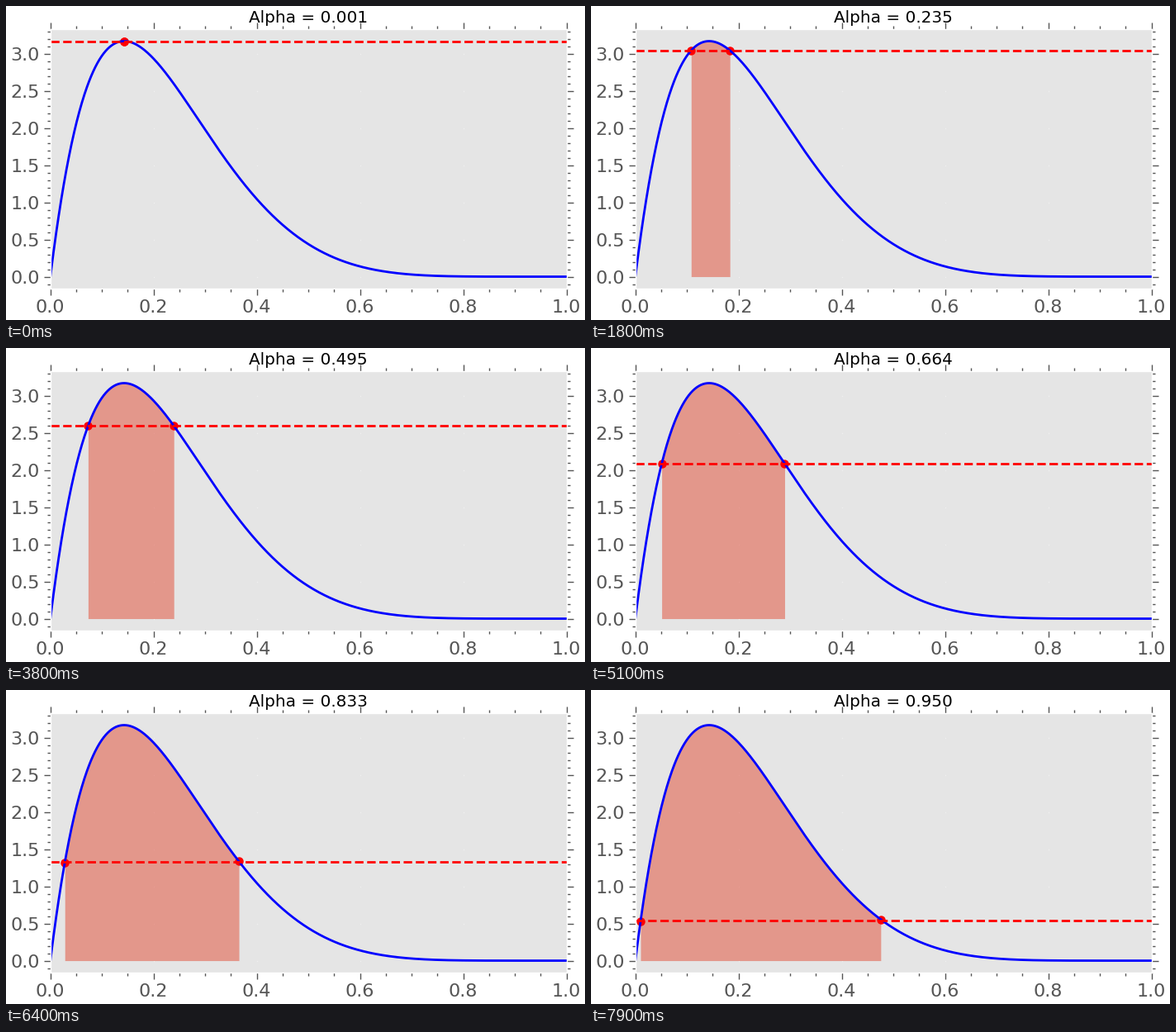
Recreate the animation shown at these times as a matplotlib script. Size 701x380 px, loop 8000 ms.

```python
import numpy as np
import matplotlib.pyplot as plt
from matplotlib.animation import FuncAnimation
from matplotlib.ticker import AutoMinorLocator, MultipleLocator

W, H, DPI = 701, 380, 100
LEFT, RIGHT, TOP, BOTTOM = 53.7, 678.6, 28.25, 341.8
FRAMES, INTERVAL = 80, 100
STEP, PEAK = 0.013, 76      # alpha climbs to PEAK, then turns back
MODE = 1 / 7
GREY = "#555555"


def pdf(x):
    """Density of Beta(2, 7)."""
    return 56 * x * (1 - x) ** 6


def cdf(x):
    return 1 - (1 - x) ** 7 * (1 + 7 * x)


# Pairs of points at equal density, with the mass between them
lows = np.linspace(0, MODE, 20001)
tail = np.linspace(1, MODE, 20001)
highs = np.interp(pdf(lows), pdf(tail), tail)
mass = cdf(highs) - cdf(lows)


def interval(alpha):
    """Ends of the narrowest interval holding the given mass."""
    low = np.interp(alpha, mass[::-1], lows[::-1])
    return low, np.interp(pdf(low), pdf(tail), tail)


plt.rcParams.update({"font.family": "DejaVu Sans", "font.size": 10})
fig = plt.figure(figsize=(W / DPI, H / DPI), dpi=DPI, facecolor="white")
ax = fig.add_axes([LEFT / W, 1 - BOTTOM / H, (RIGHT - LEFT) / W, (BOTTOM - TOP) / H],
                  facecolor="#E5E5E5")
top = pdf(MODE)
ax.set_xlim(0, 1)
ax.set_ylim(-0.05 * top, 1.05 * top)
for spine in ax.spines.values():
    spine.set(color="white", linewidth=1)

ax.xaxis.set_major_locator(MultipleLocator(0.2))
ax.yaxis.set_major_locator(MultipleLocator(0.5))
ax.xaxis.set_minor_locator(AutoMinorLocator(4))
ax.yaxis.set_minor_locator(AutoMinorLocator(5))
ax.tick_params(which="both", direction="out", top=True, right=True, color=GREY)
ax.tick_params(which="major", length=6, width=1, pad=3.5, labelsize=16, labelcolor=GREY)
ax.tick_params(which="minor", length=3, width=1)

# Barely visible grid crossings
gx, gy = np.meshgrid(np.arange(0.2, 0.9, 0.2), np.arange(0, 3.1, 0.5))
ax.plot(gx.ravel(), gy.ravel(), "s", ms=0.9, mew=0, color="white", alpha=0.45, zorder=0.5)

x = np.linspace(0, 1, 1000)
y = pdf(x)
area = ax.fill_between([0, 0], [0, 0], color="#E24A33", alpha=0.5, linewidth=0, zorder=1)
dots = ax.scatter([], [], s=36, color="red", linewidth=1.5, zorder=1.2)
ax.plot(x, y, color="blue", linewidth=2, zorder=2)
line = ax.axhline(top, color="red", linewidth=2, linestyle="--", zorder=2.1)
title = ax.set_title("", fontsize=14.4, color="black", y=1.0, pad=6)


def draw(i):
    alpha = 0.001 + STEP * (PEAK - abs(PEAK - i))
    # Snap both ends to the sampled curve
    a, b = (round(end * (len(x) - 1)) for end in interval(alpha))
    dots.set_offsets([(x[a], y[a]), (x[b], y[b])])
    line.set_ydata([(y[a] + y[b]) / 2] * 2)

    outline = np.column_stack([x[a:b + 1], y[a:b + 1]])
    area.set_verts([np.vstack([[x[a], 0], outline, [x[b], 0]])])
    title.set_text(f"Alpha = {alpha:.3f}")
    return area, dots, line, title


anim = FuncAnimation(fig, draw, frames=FRAMES, interval=INTERVAL, repeat=True,
                     repeat_delay=0, blit=False)
plt.show()
```
